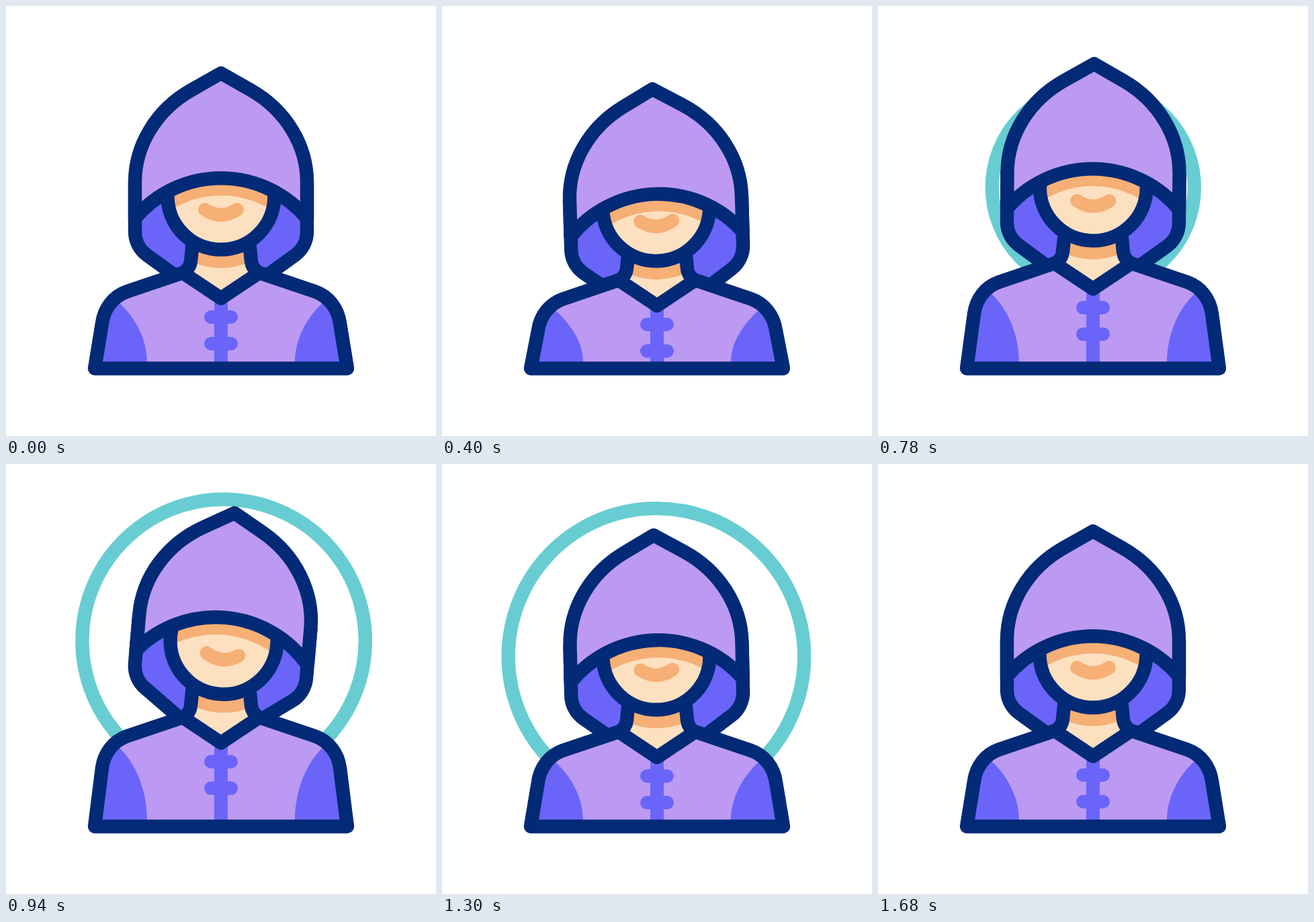
An HTML page with a canvas for the animation above (2.08 s loop, 640 by 640 pixels).

```html
<!DOCTYPE html>
<html lang="en">
<head>
<meta charset="utf-8">
<title>Hooded figure</title>
<style>
html, body { margin: 0; width: 100%; height: 100%; overflow: hidden; background: #fff; }
canvas { display: block; width: 640px; height: 640px; }
</style>
</head>
<body>
<canvas id="stage" width="640" height="640"></canvas>
<script>
const ctx = document.getElementById('stage').getContext('2d');
const LOOP = 2080;
const NAVY = '#032a76', LILAC = '#bc9af3', BLUE = '#6a65f8';
const SKIN = '#fce0bf', PEACH = '#f6af75', TEAL = '#67cdd2';

// time, body drop, face drop, hood drop, head tilt in degrees, halo radius
const KEYS = [
  [0, 0, 0, 0, 0, 80],
  [220, 0, 0, 0, 0, 80],
  [400, 11, 17, 23.5, -1.7, 80],
  [480, 13, 20, 27, -2, 80],
  [740, -8, -4, -1, 0, 122],
  [780, -14, -13, -13.7, 0.4, 150],
  [900, -22, -22, -29, 4, 200],
  [940, -20, -20, -28, 5, 210.5],
  [1040, -6, -8, -10, 0.7, 231],
  [1160, 5.5, 12, 15.5, -0.8, 197.5],
  [1200, 7, 13, 17, -1.2, 196],
  [1360, -1, -1, 1, -1.3, 231],
  [1460, 1.5, 3, 6.5, -1.2, 210.5],
  [1570, 0.5, 1.5, 3, -0.6, 115],
  [1680, 0, 0, 0, 0, 80],
  [LOOP, 0, 0, 0, 0, 80]
];

function slope(i, c) {
  return (KEYS[i + 1][c] - KEYS[i][c]) / (KEYS[i + 1][0] - KEYS[i][0]);
}

// Flat at turning points, so a curve never passes its keys
function tangent(i, c) {
  if (i === 0 || i === KEYS.length - 1) return 0;
  const a = slope(i - 1, c), b = slope(i, c);
  return a * b <= 0 ? 0 : 2 * a * b / (a + b);
}

function valueAt(t, c) {
  let i = 0;
  while (i < KEYS.length - 2 && t >= KEYS[i + 1][0]) i++;
  const span = KEYS[i + 1][0] - KEYS[i][0];
  const u = (t - KEYS[i][0]) / span, v = 1 - u;
  return v * v * (1 + 2 * u) * KEYS[i][c] + u * u * (3 - 2 * u) * KEYS[i + 1][c]
    + span * u * v * (v * tangent(i, c) - u * tangent(i + 1, c));
}

function circle(x, y, r) {
  const p = new Path2D();
  p.arc(x, y, r, 0, Math.PI * 2);
  return p;
}

function fill(path, color) {
  ctx.fillStyle = color;
  ctx.fill(path);
}

function line(path, color = NAVY, width = 20.4) {
  ctx.strokeStyle = color;
  ctx.lineWidth = width;
  ctx.stroke(path);
}

function group(draw, dy = 0, tilt = 0) {
  ctx.save();
  ctx.translate(320, 330 + dy);
  ctx.rotate(tilt * Math.PI / 180);
  ctx.translate(-320, -330);
  draw();
  ctx.restore();
}

function clipped(path, draw) {
  ctx.save();
  ctx.clip(path);
  draw();
  ctx.restore();
}

const hoodBack = new Path2D('M192 262V336C192 350 199 363 210 371L275 418H365L430 371C441 363 448 350 448 336V262');
const hoodTop = new Path2D('M192 316V262C192 208 223 155 276 125L320 100L364 125C417 155 448 208 448 262V316A167 167 0 0 0 192 316Z');
const neck = new Path2D('M278 340L275 380Q274 390 264 397L320 435L376 397Q366 390 365 380L362 340Z');
const neckSides = new Path2D('M278 350L275 380Q274 390 264 397M362 350L365 380Q366 390 376 397');
const mouth = new Path2D('M296 303Q320 319 344 303');
const face = circle(320, 283, 79.5);
const jawShade = circle(320, 283, 107);
const brimShade = circle(320, 423, 167);

function drawBody(d) {
  const y = v => v + d;
  const torso = new Path2D(`M132 539.5L143 ${y(472)}C146 ${y(450)} 160 ${y(432)} 180 ${y(425)}L263 ${y(397)}`
    + `L320 ${y(435)}L377 ${y(397)}L460 ${y(425)}C480 ${y(432)} 494 ${y(450)} 497 ${y(472)}L508 539.5Z`);
  const sleeves = new Path2D(`M164 ${y(438)}C193 ${y(462)} 210 ${497 + d / 2} 210 530V540H120V${y(438)}Z`
    + `M476 ${y(438)}C447 ${y(462)} 430 ${497 + d / 2} 430 530V540H520V${y(438)}Z`);
  fill(torso, LILAC);
  clipped(torso, () => {
    fill(sleeves, BLUE);
    line(new Path2D(`M320 ${y(430)}V540`), BLUE, 20);
    line(new Path2D(`M305 ${y(463)}H335M305 ${y(502.5)}H335`), BLUE, 20);
  });
  line(torso);
}

function draw(t) {
  const [body, head, hood, tilt, radius] = [1, 2, 3, 4, 5].map(c => valueAt(t, c));
  ctx.fillStyle = '#fff';
  ctx.fillRect(0, 0, 640, 640);
  ctx.lineCap = ctx.lineJoin = 'round';

  group(() => line(circle(320, 283, radius), TEAL), head, tilt);
  group(() => {
    fill(hoodBack, BLUE);
    line(hoodBack);
  }, hood, tilt);

  group(() => fill(neck, SKIN), body);
  ctx.save();
  ctx.translate(0, body);
  ctx.clip(neck);
  ctx.translate(0, -body);
  group(() => fill(jawShade, PEACH), head, tilt);
  ctx.restore();
  group(() => line(neckSides), body);

  drawBody(body);

  group(() => {
    fill(face, SKIN);
    line(mouth, PEACH, 20);
    clipped(face, () => {
      // Step back out of the face drop so the shade follows the hood
      const a = tilt * Math.PI / 180, gap = hood - head;
      ctx.translate(gap * Math.sin(a), gap * Math.cos(a));
      line(brimShade, PEACH, 52);
    });
    line(face);
  }, head, tilt);

  group(() => {
    fill(hoodTop, LILAC);
    line(hoodTop);
  }, hood, tilt);
}

const start = performance.now();
function tick() {
  draw((performance.now() - start) % LOOP);
  requestAnimationFrame(tick);
}
tick();
</script>
</body>
</html>
```
